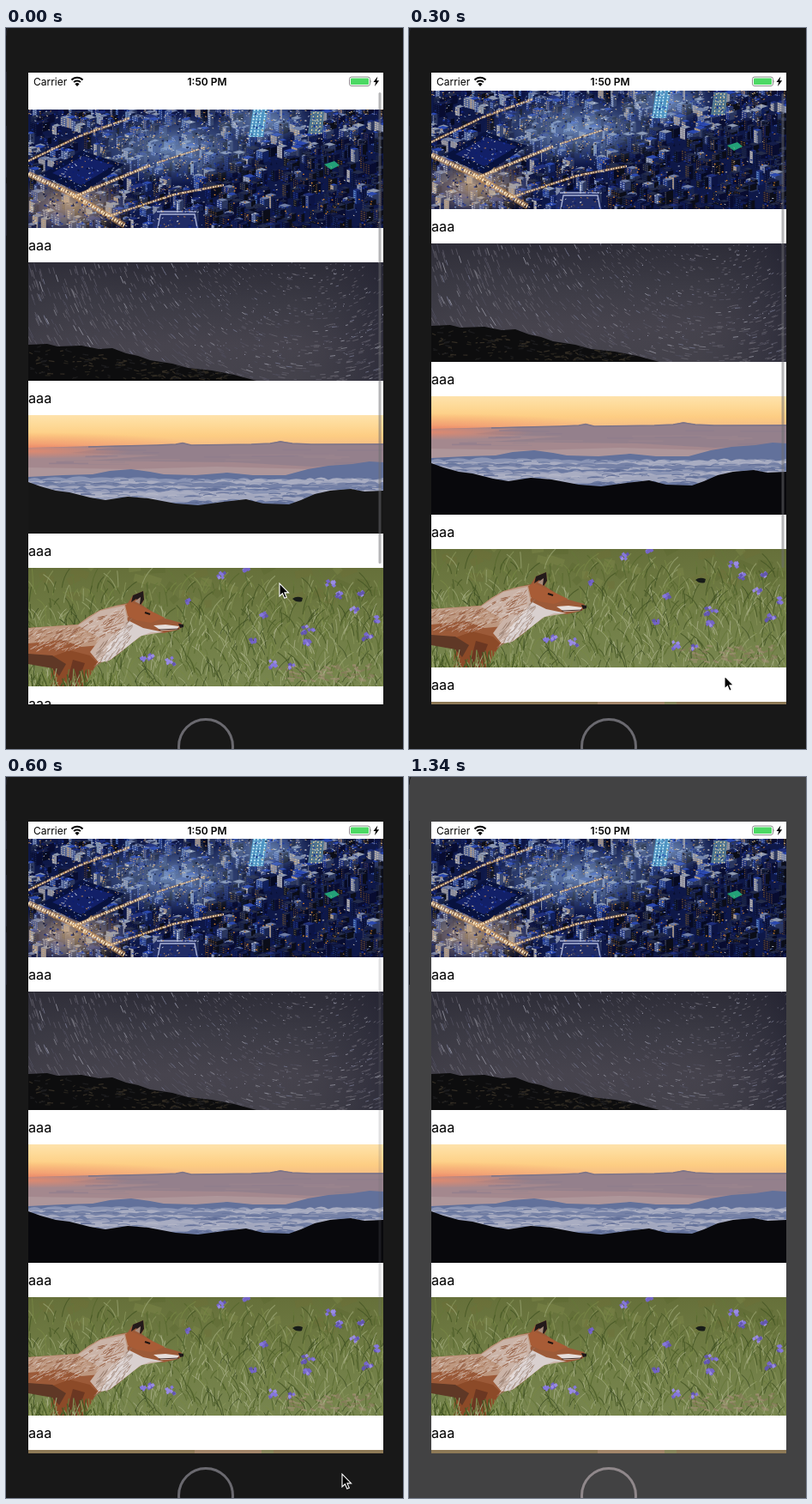
Animation of 463x840 px, one loop 1.44 s. Source, as an HTML page:

```html
<!DOCTYPE html>
<html lang="en">
<head>
<meta charset="utf-8">
<title>Photo list</title>
<style>
html, body { margin: 0; width: 100%; height: 100%; overflow: hidden; background: #181818; }
svg { display: block; width: 463px; height: 840px; }
text { font-family: Inter, "Liberation Sans", sans-serif; fill: #000; }
</style>
</head>
<body>
<svg id="stage" viewBox="0 0 463 840" xmlns="http://www.w3.org/2000/svg"></svg>
<script>
const LOOP = 1440, W = 414, H = 138, PITCH = 178;

let seed = 11;
const rnd = (a = 1, b = 0) => {
  seed = (seed * 16807) % 2147483647;
  return b + (a - b) * (seed / 2147483647);
};
const pick = list => list[Math.floor(rnd(list.length))];
const f = n => n.toFixed(1);
const shape = (d, fill, extra = '') => `<path d="${d}" fill="${fill}" ${extra}/>`;
const line = (d, color, w = 1, extra = '') => shape(d, 'none', `stroke="${color}" stroke-width="${w}" ${extra}`);
const rect = (x, y, w, h, fill, extra = '') =>
  `<rect x="${f(x)}" y="${f(y)}" width="${f(w)}" height="${f(h)}" fill="${fill}" ${extra}/>`;
// Stops are [offset, colour, opacity]
const stops = list => list.map(([o, c, a = 1]) => `<stop offset="${o}" stop-color="${c}" stop-opacity="${a}"/>`).join('');
const gradient = (id, list, dir = 'x2="0" y2="1"') => `<linearGradient id="${id}" ${dir}>${stops(list)}</linearGradient>`;
const glow = (id, color) => `<radialGradient id="${id}">${stops([[0, color, .75], [1, color, 0]])}</radialGradient>`;
const blob = (x, y, rx, ry, fill) => `<ellipse cx="${x}" cy="${y}" rx="${rx}" ry="${ry}" fill="${fill}"/>`;

// Many short strokes, merged into one path per colour
function strokes(n, colors, w, make, extra) {
  const d = colors.map(() => '');
  for (let i = 0; i < n; i++) d[i % colors.length] += make(i);
  return d.map((p, i) => line(p, colors[i], w, extra)).join('');
}

function building(x, y, dark) {
  const w = rnd(8, 3), u = w * .3, h = rnd(17, 6);
  const left = dark ? pick(['#0a1036', '#0d1750', '#0c1020', '#171f40']) : pick(['#26408e', '#4c5f94', '#7c85a2', '#1c2f7c', '#8c8a94', '#33427a']);
  const right = dark ? pick(['#060a22', '#080c30', '#0b0d18']) : pick(['#10205c', '#182450', '#2b375f', '#0c1444']);
  const roof = dark ? pick(['#141d4a', '#242c4a']) : pick(['#2a48b0', '#6f7ea6', '#1f2f7c', '#8e99b0']);
  const lamp = dark ? pick(['#73674f', '#96652c', '#2a448c', '#1c2c60']) : pick(['#f7deae', '#e6ecee', '#8cc0e4', '#e8ae66', '#c4cbdc', '#9fabc8']);
  let d = '';
  for (let k = 1.5; k < h; k += 2.4) d += `M${f(x + .5)} ${f(y + k)}l${f(w - .8)} ${f(u)}`;
  return shape(`M${f(x)} ${f(y)}l${f(w)} ${f(u)}v${f(h)}l${f(-w)} ${f(-u)}z`, left) +
    shape(`M${f(x + w)} ${f(y + u)}l${f(w)} ${f(-u)}v${f(h)}l${f(-w)} ${f(u)}z`, right) +
    shape(`M${f(x)} ${f(y)}l${f(w)} ${f(-u)}l${f(w)} ${f(u)}l${f(-w)} ${f(u)}z`, roof) +
    line(d, lamp, 1, `stroke-dasharray="${f(rnd(2.4, .8))} ${f(rnd(2, .8))}" opacity=".8"`);
}

function city() {
  const shaded = (x, y) => x > 205 && y > 32 + (W - x) * .11;
  let s = rect(0, 0, W, H, '#0e1848');
  for (let i = 0; i < 780; i++) {
    const y = -14 + 150 * i / 780, x = rnd(W + 8, -10);
    s += building(x, y, shaded(x, y) ? rnd() < .86 : rnd() < .38);
  }
  s += blob(50, 112, 75, 36, 'url(#warm)') + blob(170, 45, 110, 42, 'url(#cool)') + blob(275, 12, 60, 28, 'url(#cool)');
  s += shape('M14 76L62 48L112 64L62 98z', '#08123e') + shape('M28 74L64 54L100 65L62 88z', '#122068');
  const street = (d, w) => line(d, '#c58b50', w, 'opacity=".55"') +
    line(d, '#ffe0a8', w * .6, 'stroke-dasharray="2 1 1 2" opacity=".8"') +
    line(d, '#fff6e2', w * .3, 'stroke-dasharray="1 2"');
  s += street('M0 75L52 99L112 135', 7) + street('M52 102L142 65', 4) +
    street('M0 60L62 30L118 10', 3) + street('M94 124L170 99L228 88', 3) + street('M150 62L206 44', 2.2);
  s += shape('M146 122l5 -5h44l4 21h-54z', '#202c66') +
    line('M151 138l3 -16h40l3 16M150 119h46', '#a9b2d6', 1.4) + line('M174 110v10', '#c6d0e4');
  s += shape('M262 0h17l-5 32h-17z', '#4e94c2') +
    line('M264 0l-5 32M268 0l-5 32M272 0l-5 32M277 0l-5 32', '#c4eaf8', 1.6, 'stroke-dasharray="2 1.5"');
  s += shape('M330 2h15l-2 26h-17z', '#4f748e') + line('M333 3l-3 26M338 3l-3 26M342 3l-3 26', '#e9d4a0', 1.2, 'stroke-dasharray="2 2"');
  s += shape('M345 64l12 -4l6 5l-10 5z', '#23a078');
  const dot = dim => () => {
    let x, y;
    do { x = rnd(W); y = rnd(H); } while (shaded(x, y) && rnd() < dim);
    return `M${f(x)} ${f(y)}l${f(rnd(2.4, .7))} ${f(rnd(1, -1))}`;
  };
  return s + strokes(1000, ['#f6d9a4', '#dbe3ee', '#e09a4c', '#8fb0e2', '#fff2d8'], 1, dot(.85), 'opacity=".8"') +
    strokes(900, ['#060b28', '#0b1c70', '#1a36a4'], 1.7, dot(.1), 'opacity=".75"') +
    strokes(60, ['#e88c2a', '#b86c20'], 1.2, () => `M${f(rnd(400, 180))} ${f(rnd(135, 70))}h1.6`);
}

function stars() {
  let s = rect(0, 0, W, H, 'url(#night)') + rect(0, 0, W, H, 'url(#nightSide)');
  const px = 330, py = -80;
  const trail = () => {
    const x = rnd(W), y = rnd(H), k = rnd(.04, .015);
    return `M${f(x)} ${f(y)}l${f((y - py) * k)} ${f((px - x) * k)}`;
  };
  s += strokes(800, ['#5c5a66', '#66646e', '#504f5e'], .8, trail) +
    strokes(150, ['#85848f', '#9a9aa6', '#74768f'], .8, trail) +
    strokes(110, ['#77768a', '#9a9aae'], .9, () => `M${f(rnd(W, 180))} ${f(rnd(120))}h1`);
  const rock = 'M0 96L22 95L34 98L62 97L82 101L98 100L114 106L128 109L142 114L168 118L186 123L214 126L240 131L266 138H0z';
  s += shape(rock, '#0d0d0e');
  return s + '<g clip-path="url(#rock)">' + strokes(170, ['#25221c', '#332d24', '#1c1c1e'], 1.2, () => {
    const x = rnd(235);
    return `M${f(x)} ${f(rnd(136, 96 + x * .14))}l${f(rnd(7, 2))} ${f(rnd(2, -2))}`;
  }) + '</g>' + `<clipPath id="rock"><path d="${rock}"/></clipPath>`;
}

function sunset() {
  let s = rect(0, 0, W, 40, 'url(#dusk)') + blob(0, 38, 210, 18, 'url(#ember)');
  s += shape('M0 38L80 36L150 35L172 34L180 32L190 35L260 34L282 33L294 30L308 33L330 34L414 33V80H0z', '#94808c') +
    shape('M0 38L100 37L50 44L150 47L70 53L240 55L330 60L414 57V80H0z', '#a4888e') +
    blob(0, 42, 120, 9, 'url(#ember)') +
    shape('M0 61L120 63L220 60L330 63L414 55V84H0z', '#ae969a');
  s += strokes(26, ['#8e7c8c', '#9d858e'], 1.6, () => `M${f(rnd(380, 20))} ${f(rnd(58, 40))}h${f(rnd(60, 15))}`, 'opacity=".6"');
  s += line('M70 37L150 35L172 34L180 32.5L190 35L260 34L282 33L294 31L308 33L330 34L414 34', '#7d7488', 1.6);
  s += shape('M0 72L40 70L75 69L95 65L120 63L142 66L158 69L195 70L232 67L262 70L300 70L326 63L350 59L378 57L398 54L414 55V110H0z', '#62719b');
  const row = (y, color, amp) => {
    let d = `M0 110V${y}`;
    for (let x = 0; x < W; ) {
      const w = rnd(30, 10);
      d += `q${f(w / 2)} ${f(-rnd(amp, 1))} ${f(w)} ${f(rnd(1.2, -1.2))}`;
      x += w;
    }
    return shape(d + 'V110z', color);
  };
  const tones = ['#8a94b4', '#a9adc2', '#7581a6', '#a2a7be', '#6c7aa2', '#959cb8'];
  for (let i = 0; i < 11; i++) s += row(75 + i * 2.6, tones[i % tones.length], 6);
  s += strokes(170, ['#b9bccb', '#66759d', '#9aa1bb', '#5c6a94'], 1.1,
    () => `M${f(rnd(W))} ${f(rnd(104, 74))}q${f(rnd(7, 3))} ${f(rnd(0, -3))} ${f(rnd(20, 9))} 0`, 'opacity=".8"');
  return s + shape('M0 78L14 83L32 88L48 90L72 96L90 99L116 95L140 97L172 103L198 105L228 101L254 98L274 103L304 104L318 99L334 92L352 88L376 86L392 89L414 88V138H0z', '#08080c', 'id="ground"');
}

function flower(x, y, r) {
  let s = '';
  for (let i = 0; i < r * 1.5; i++)
    s += shape(`M${f(x + rnd(r, -r))} ${f(y + rnd(r, -r) * .8)}l${f(rnd(4, 2))} -2l2 3l-3 2z`, pick(['#7565c8', '#8577dc', '#6256ae', '#9a8ce4']));
  return line(`M${x} ${y}l${f(rnd(5, -5))} ${f(r + 15)}`, '#566a34') + s;
}

function meadow() {
  const greens = ['#54662c', '#87935a', '#9aa573', '#66773a', '#788746', '#435523'];
  const blade = (top, bottom, len) => () => {
    const h = rnd(len, 5), lean = rnd(.9, -.9) * h;
    return `M${f(rnd(W))} ${f(rnd(bottom, top))}q${f(lean * .2)} ${f(-h * .6)} ${f(lean)} ${f(-h)}`;
  };
  let s = rect(0, 0, W, H, 'url(#grass)');
  s += strokes(40, ['#5a6730', '#7f8a4c', '#6e6f38'], 9, () => `M${f(rnd(W, -10))} ${f(rnd(45))}l${f(rnd(20, 5))} ${f(rnd(8, -8))}`, 'opacity=".4"');
  s += strokes(1000, greens, 1.1, blade(22, 158, 24), 'opacity=".75"') +
    strokes(260, ['#a9b286', '#b5b996', '#33431f'], .9, blade(55, 152, 20), 'opacity=".75"');
  s += strokes(70, ['#8c7960', '#a69178'], 2, () => `M${f(rnd(400, 290))} ${f(rnd(132, 112))}l${f(rnd(8, 3))} ${f(rnd(3, -3))}`, 'opacity=".6"');
  [[136, 106, 7], [163, 108, 5], [324, 72, 7], [283, 112, 5], [305, 114, 3], [392, 79, 6], [350, 17, 6], [357, 31, 5],
    [378, 49, 4], [184, 39, 3], [223, 8, 4], [252, 3, 3], [272, 54, 4], [404, 59, 4], [260, 83, 4], [322, 86, 5], [386, 30, 3]]
    .forEach(p => s += flower(...p));
  s += shape('M308 36q5 -4 12 -1l-1 4q-6 2 -11 -3z', '#171b18');

  // Fox
  s += shape('M0 70L28 68L58 66L70 57L84 49L102 44L116 41L122 32L134 27L135 37L132 43L146 52L160 59L178 64L181 68L175 72L158 76L143 75L132 79L120 88L108 98L96 107L82 111L74 120L60 138H24L30 116L0 110z', '#9c5a38');
  s += shape('M0 70L28 68L58 66L70 57L84 49L102 44L115 42L118 55L106 74L84 90L62 92L40 84L0 88z', '#bd977f');
  s += shape('M58 67L84 50L112 44L116 62L134 71L156 75L132 79L112 94L96 107L82 110L72 98L84 82z', '#cbb4a8');
  s += shape('M118 62L134 70L158 75L143 75L130 80L114 93L94 108L84 110L96 88z', '#d9d0cf');
  s += shape('M26 104L48 96L72 102L80 110L66 138H27z', '#8c4a28');
  s += shape('M0 100L28 102L44 112L36 126L28 117L0 112z', '#5f3826') + shape('M52 107L66 111L56 138H44z', '#6b3722');
  s += shape('M113 43L120 40L136 47L159 58L143 64L126 61L116 56z', '#a85c36') + shape('M146 67L160 66L176 68L173 72L155 73z', '#e6dedb');
  s += shape('M120 40L122 32L134 27L135 37L131 43L126 36z', '#231a1a') + shape('M124 39L131 34L130 42z', '#a88c7c');
  s += line('M136 52l6 2', '#1e1411', 2.2) + shape('M175 65L181 66L181 69L177 70z', '#1c1819') + line('M152 72L176 71', '#46302a', 1);
  s += strokes(300, ['#e0d3cc', '#a0694a', '#cdb2a3', '#8c5236'], .9, () => {
    const x = rnd(112, 4), y = rnd(94, 69) - Math.max(0, x - 55) * .42;
    return `M${f(x)} ${f(y)}l${f(-rnd(8, 3))} ${f(rnd(5, 1))}`;
  }, 'opacity=".75"');
  s += strokes(110, ['#eee8e6', '#b39f96', '#9a7c6c'], .9, () => {
    const x = rnd(122, 82), y = 174 - x * .84 + rnd(12, -14);
    return `M${f(x)} ${f(y)}l${f(-rnd(7, 3))} ${f(rnd(8, 3))}`;
  }, 'opacity=".8"');
  return s + strokes(120, greens, 1.1, () => `M${f(rnd(110))} 140l${f(rnd(8, -8))} ${f(-rnd(24, 5))}`);
}

const strip = () => rect(0, 0, W, H, '#8d7956') + rect(194, 0, 84, H, '#a3866a') + rect(272, 0, 14, H, '#88865b');

const photos = [city, stars, sunset, meadow, strip].map((draw, i) =>
  `<svg y="${i * PITCH}" width="${W}" height="${H}">${draw()}</svg>` +
  `<text x="0" y="${i * PITCH + 163.7}" font-size="16.2">aaa</text>`).join('');

const arc = r => line(`M${f(83 - r * .72)} ${f(67 - r * .72)}A${r} ${r} 0 0 1 ${f(83 + r * .72)} ${f(67 - r * .72)}`, '#000', 2);

document.getElementById('stage').innerHTML = `
<defs>
  ${gradient('night', [[0, '#2d2c37'], [.35, '#3c3b45'], [.7, '#47444e'], [1, '#45434c']])}
  ${gradient('nightSide', [[0, '#32313a', .3], [.3, '#4a4752', 0], [.75, '#35343f', .1], [1, '#202030', .6]], '')}
  ${gradient('dusk', [[0, '#fee2ac'], [.25, '#fedb9a'], [.6, '#fdcd83'], [.85, '#f6bf84'], [1, '#dca38b']])}
  ${gradient('grass', [[0, '#66703a'], [.5, '#707d45'], [1, '#78864f']])}
  ${glow('warm', '#d9b48a')}${glow('cool', '#7f9fd0')}${glow('ember', '#f08a66')}
  <clipPath id="screen"><rect x="26" y="52" width="414" height="736"/></clipPath>
</defs>
<rect id="bezel" width="463" height="840"/>
<path id="edge" d="M0 9Q0 3 2 0M.5 51V84M.5 114V174M.5 181V242" fill="none"/>
<circle id="home" cx="233" cy="837" r="31.5" fill="none" stroke-width="3"/>
<g clip-path="url(#screen)">
  <rect x="26" y="52" width="414" height="736" fill="#fff"/>
  <g id="list">${photos}</g>
  <rect x="26" y="52" width="414" height="20" fill="#fff"/>
  <rect id="bar" x="434.5" width="3" rx="1.5" fill="#6c6c70"/>
</g>
<text x="32" y="66.8" font-size="12">Carrier</text>
<text x="234.5" y="66.8" font-size="12" font-weight="600" text-anchor="middle">1:50 PM</text>
${arc(9)}${arc(5.4)}<path d="M83 68l-2.6 -2.8q2.6 -2.2 5.2 0z"/>
<rect x="400.5" y="57" width="24" height="10.5" rx="2.5" fill="none" stroke="#8d8d8d"/>
<rect x="402" y="58.5" width="21" height="7.5" rx="1" fill="#4cd964"/>
<path d="M425.5 60.5q1.6 1.7 0 3.6z" fill="#8d8d8d"/>
<path d="M433.4 56.5l-4.9 6.4h2.7l-1.2 5.1l5.2 -6.7h-2.9z"/>
<path id="cursor" d="M0 0V15L3.4 11.8L5.8 17.3L8.3 16.2L5.9 10.9H10.6z" fill="#000" stroke="#fff" stroke-width="1.1"/>`;

const $ = id => document.getElementById(id);
const set = (id, attrs) => { for (const k in attrs) $(id).setAttribute(k, attrs[k]); };

// start ms, list top, bar top, bar end, bar opacity, cursor x, cursor y
const STEPS = [
  [0, 95, 75, 624, .5, 319, 647],
  [150, 77.5, 79, 632, .5, 344.5, 709],
  [300, 73, 76, 629, .5, 368, 755],
  [450, 72, 75, 628, .5, 378, 779.5],
  [600, 72, 75, 628, .2, 392, 812],
  [750, 72, 75, 628, 0, 412.5, 835.5],
  [890, 72, 75, 628, 0, 500, 900]
];

function render(t) {
  const [, top, y0, y1, alpha, cx, cy] = STEPS.filter(s => s[0] <= t).pop();
  const light = t >= 1340;
  set('list', { transform: `translate(26 ${top})` });
  set('bar', { y: y0, height: y1 - y0, opacity: alpha });
  set('cursor', { transform: `translate(${cx} ${cy})` });
  set('bezel', { fill: light ? '#424243' : '#181818' });
  set('edge', { stroke: light ? '#161618' : '#25252d' });
  set('home', { stroke: light ? '#90888b' : '#6a696f' });
  set('ground', { fill: t < 150 ? '#161616' : '#08080c' });
}

const start = performance.now();
function tick() {
  render((performance.now() - start) % LOOP);
  requestAnimationFrame(tick);
}
tick();
</script>
</body>
</html>
```
